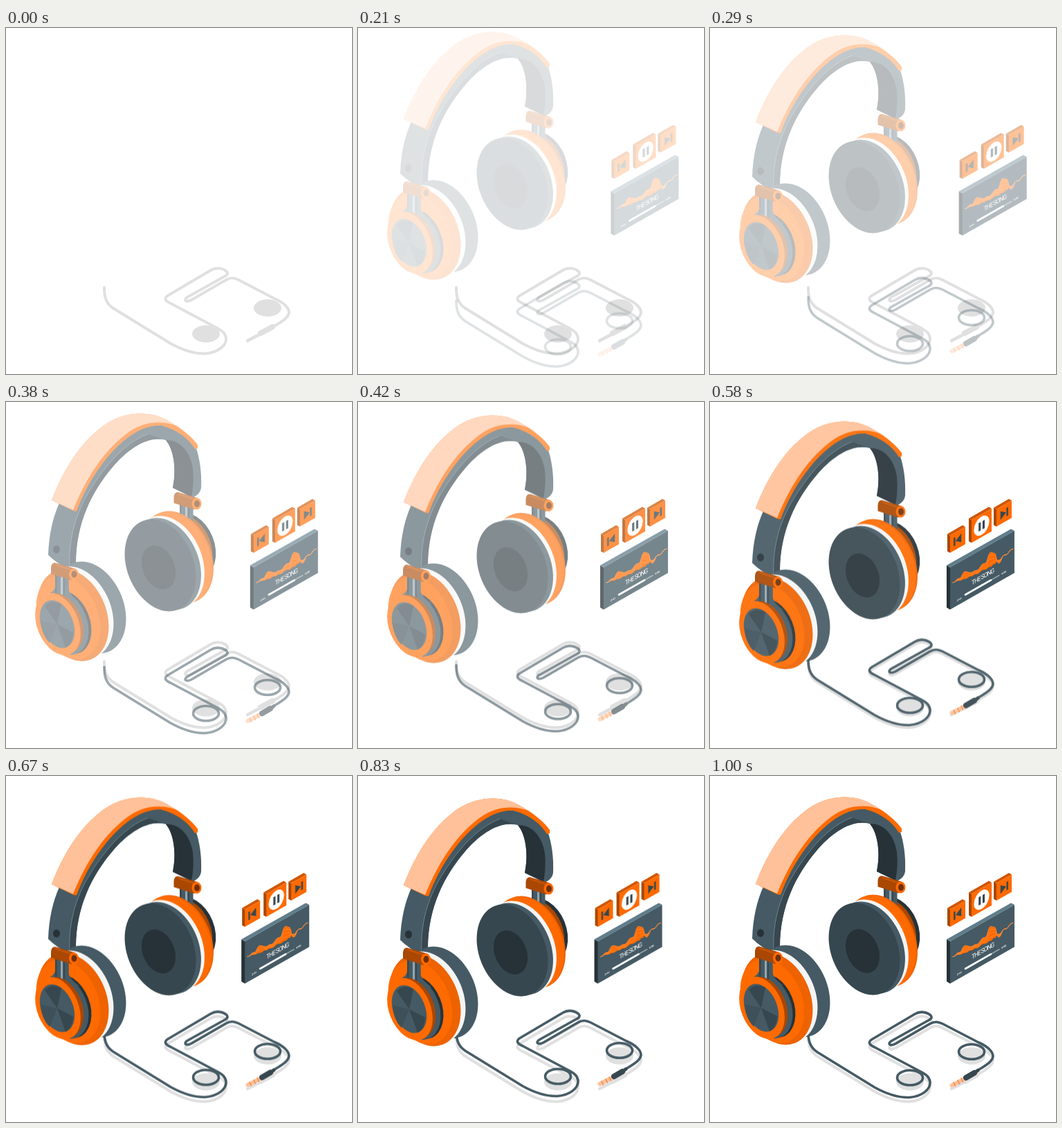
Recreate the animation shown at these times as an HTML page. Size 500 by 500 pixels, loop 1040 ms.

```html
<!DOCTYPE html>
<html lang="en">
<head>
<meta charset="utf-8">
<title>Headphones</title>
<style>
  html, body { margin: 0; width: 100%; height: 100%; overflow: hidden; background: #fff; }
  svg { display: block; width: 100vw; height: 100vh; }
  text { font-family: Roboto, "Open Sans", sans-serif; fill: #fff; }
</style>
</head>
<body>
<svg id="stage" viewBox="0 0 500 500"></svg>
<script>
const C = {
  ink: '#263238', dark: '#37474f', slate: '#455a64', steel: '#607d8b',
  orange: '#ff6a00', amber: '#ee6200', rust: '#a94703', peach: '#ffc199',
  white: '#fff', pale: '#f5f5f5', shade: '#e0e0e0'
};

const path = (d, fill) => `<path d="${d}" fill="${fill}"/>`;
const line = (d, color, width) =>
  `<path d="${d}" fill="none" stroke="${color}" stroke-width="${width}" stroke-linecap="round" stroke-linejoin="round"/>`;
const poly = (points, fill) => `<polygon points="${points}" fill="${fill}"/>`;
const disc = (x, y, rx, ry, fill, extra = '') =>
  `<ellipse cx="${x}" cy="${y}" rx="${rx}" ry="${ry}" fill="${fill}" ${extra}/>`;
const tilted = (x, y, rx, ry, fill) =>
  disc(x, y, rx, ry, fill, `transform="rotate(-22 ${x} ${y})"`);
const cupDisc = (x, y, fill) => tilted(x, y, 48, 69, fill);
const group = (id, body) => `<g id="${id}">${body}</g>`;
const iso = (x, y, body) => `<g transform="matrix(.866 -.495 0 1 ${x} ${y})">${body}</g>`;

const CORD = 'M142 375C142 386 143 397 155 405L238 456C258 467 273 471 288 470.5' +
  'C306 469 319 459 318 448C317 440 311 437 304 433L238 398C229 394 228 390 235 386' +
  'L296 350C306 344 316 349 319 352C322 356 318 358 314 360L262 389C256 393 260 397 268 393' +
  'L318 364C325 360 330 361 336 364L388 391C402 397 409 405 409 411C408 420 395 426 386 432';
const LOOPS = [[289, 442], [378, 404.5]];

function shadow() {
  return line(CORD, C.shade, 4) +
    LOOPS.map(([x, y]) => disc(x, y, 20, 12.5, C.shade)).join('') +
    line('M349 452L366 443', C.shade, 4.5) +
    line('M368 441L385 432', C.shade, 8);
}

function cord() {
  const loops = LOOPS.map(([x, y]) =>
    disc(x, y, 18.5, 10.8, 'none', `stroke="${C.slate}" stroke-width="3.6"`)).join('');
  const jack = line('M349.5 453L366 444.5', C.peach, 6) +
    line('M352 449l2.5 5M358 446l2.5 5M363 443l2.5 5', '#f28a4a', 1.5) +
    line('M370 442L382 435', C.dark, 8) +
    line('M382 435L387 431.5', C.dark, 5);
  return `<g transform="translate(0 -6)">${line(CORD, C.slate, 3.6)}${loops}${jack}</g>`;
}

function hinge(x, y) {
  return path(`M${x - 33} ${y - 10}Q${x - 32} ${y - 18} ${x - 26} ${y - 16.5}L${x + 1} ${y - 8.5}` +
      `L${x - 3} ${y + 8.5}L${x - 33} ${y - 1}Z`, C.rust) +
    line(`M${x - 26} ${y - 14}L${x - 2} ${y - 6}`, '#c65304', 2.5) +
    disc(x, y, 7, 8.5, C.orange) + disc(x + .5, y, 4, 5, '#6f2f06');
}

function posts(x, y, height) {
  const post = (dx, width, fill) =>
    `<rect x="${x + dx}" y="${y}" width="${width}" height="${height}" fill="${fill}"/>`;
  return post(7, 5, '#90a4ae') + [0, 11.5].map(dx => post(dx, 8, C.slate) + post(dx, 2.5, C.dark)).join('');
}

function band() {
  const top = 'M66 156C84 108 112 66 147 44C176 27 210 26 236 42';
  const inner = 'C205 62 176 82 154 108C125 142 101 188 101 247';
  const seam = 'C90 215 99 182 115 152C140 108 172 72 205 60';
  return path('M61 235C62 205 68 180 77 160C98 110 150 50 205 44C240 44 264 58 274 78' +
      'C280 95 283 115 282 138Q281 147 270 152L241 138C246 115 244 85 231 69' +
      inner + 'L101 255L92 256Q74 248 61 235Z', C.slate) +
    path('M231 69C250 68 266 84 270 110Q272 130 268 151L241 138C246 115 244 85 231 69Z', C.ink) +
    path('M92 256' + seam + 'L231 69' + inner + 'V255Z', C.dark) +
    line('M92 255' + seam, '#78909c', .8) +
    disc(73, 227, 5, 5.8, C.ink) +
    path(top + 'C256 53 270 66 277 76L277 81L273 82C264 67 248 54 224 48' +
      'C190 46 158 78 138 105C121 128 110 150 102 172L97 171Z', C.orange) +
    path(top + 'L248 49C225 40 200 42 178 57C143 82 117 121 97 170Z', C.peach);
}

function rightCup() {
  return tilted(265, 222, 36, 50, C.ink) +
    tilted(260, 224, 36, 50, C.rust) +
    posts(251, 158, 40) +
    cupDisc(248.5, 238, C.amber) +
    cupDisc(246, 239, C.orange) +
    cupDisc(235.5, 245, C.pale) +
    cupDisc(230.5, 248, C.slate) +
    cupDisc(223, 250, C.dark) +
    tilted(220.5, 253, 23, 33, C.ink) +
    hinge(275.5, 161);
}

function leftCup() {
  return cupDisc(122, 311, C.slate) +
    cupDisc(104, 318, C.pale) +
    cupDisc(97, 322, C.amber) +
    tilted(90, 325, 43, 63, C.orange) +
    tilted(88, 332, 33, 48, C.ink) +
    tilted(84, 333, 33, 48, C.slate) +
    path('M71 262V281Q70 288 54 297L106 303Q91 292 90.5 284V262Z', C.slate) +
    posts(71, 260, 36) +
    tilted(78, 334, 32, 46, C.rust) +
    tilted(75, 335, 30, 47, C.orange) +
    tilted(74, 335, 23, 36, C.slate) +
    path('M74 335L56 309Q66 298 80 306ZM74 335L97 347Q96 364 86 369Z', C.dark) +
    path('M74 335L50 330Q51 350 63 362Z', '#3e515b') +
    hinge(98, 263);
}

function button(x, y, w, h, icon) {
  const d = w * .572;
  return poly(`${x},${y} ${x - 4},${y - 2.3} ${x - 4},${y + h - 2.3} ${x},${y + h}`, C.rust) +
    poly(`${x},${y} ${x - 4},${y - 2.3} ${x + w - 4},${y - d - 2.3} ${x + w},${y - d}`, '#d15600') +
    poly(`${x},${y} ${x + w},${y - d} ${x + w},${y - d + h} ${x},${y + h}`, C.orange) +
    iso(x + w / 2, y - d / 2 + h / 2, icon);
}

// Sound curve: height above a slanted base line, scaled for each ribbon.
const PEAKS = [[351, 0], [360, 1], [369, 6], [377, 0], [384, -1], [397, 2],
  [406, 13], [411, 9], [417, -9], [426, -2], [438, 0]];
function wave(scale, drop, back = false) {
  const pts = PEAKS.map(([x, h]) =>
    [x, 261 - (x - 351) * .56 - h * scale + drop * Math.sin((x - 351) / 87 * Math.PI)]);
  if (back) pts.reverse();
  let d = pts[0].join(' ');
  for (let i = 1; i < pts.length; i++) {
    const [x0, y0] = pts[i - 1], [x1, y1] = pts[i], mid = (x0 + x1) / 2;
    d += `C${mid} ${y0} ${mid} ${y1} ${x1} ${y1}`;
  }
  return d;
}

function player() {
  const bar = x => `<rect x="${x}" y="-6" width="3.6" height="12" fill="${C.dark}"/>`;
  const pause = disc(0, 0, 12.8, 13.3, C.white) + bar(-5) + bar(1.6);
  const skip = side => `<g transform="scale(${side} 1)">${path('M-6 -6.2L3.5 0L-6 6.2ZM4 -6H6.8V6H4Z', C.dark)}</g>`;
  const ribbons = [.75, .45, .15].map((s, i) => line('M' + wave(s, 2 * i + 1), '#ff9a55', .5)).join('');
  return button(347, 193, 22, 25, skip(-1)) +
    button(378, 170.5, 29, 33, pause) +
    button(414, 155, 22, 25, skip(1)) +
    poly('347,239 342,236 342,297 347,300', C.ink) +
    poly('347,239 342,236 435,183.5 440,186', C.steel) +
    poly('347,239 440,186 440,247 347,300', C.slate) +
    path('M' + wave(1, 0) + 'L' + wave(-.1, 7, true) + 'Z', C.orange) +
    ribbons +
    line('M' + wave(1, 0), '#ff8430', .8) +
    iso(378, 265, '<text font-size="9.5" letter-spacing="-1.05">THE SONG</text>') +
    line('M369 278.5L418 250.5', '#90a4ae', 1.6) +
    line('M369 278.5L406 257.3', C.white, 2.6) +
    iso(357, 288.5, '<text font-size="4" font-weight="700">2:41</text>') +
    iso(421, 250, '<text font-size="4" font-weight="700">4:00</text>');
}

document.getElementById('stage').innerHTML = shadow() + group('cord', cord()) +
  group('phones', band() + leftCup() + rightCup()) + group('player', player());

const LOOP = 1040;
const EASE = 'cubic-bezier(.36, -.01, .5, 1.38)';

// Slides in from (x, y) while fading, overshoots, then rests until the loop ends.
function enter(id, x, y, time) {
  const rest = { transform: 'translate(0px, 0px)', opacity: 1 };
  document.getElementById(id).animate([
    { transform: `translate(${x}px, ${y}px)`, opacity: 0, offset: 0, easing: EASE },
    { ...rest, offset: time / LOOP },
    { ...rest, offset: 1 }
  ], { duration: LOOP, iterations: Infinity });
}

enter('phones', 0, -30, 955);
enter('cord', 0, 30, 955);
enter('player', 30, 0, 850);
</script>
</body>
</html>
```
